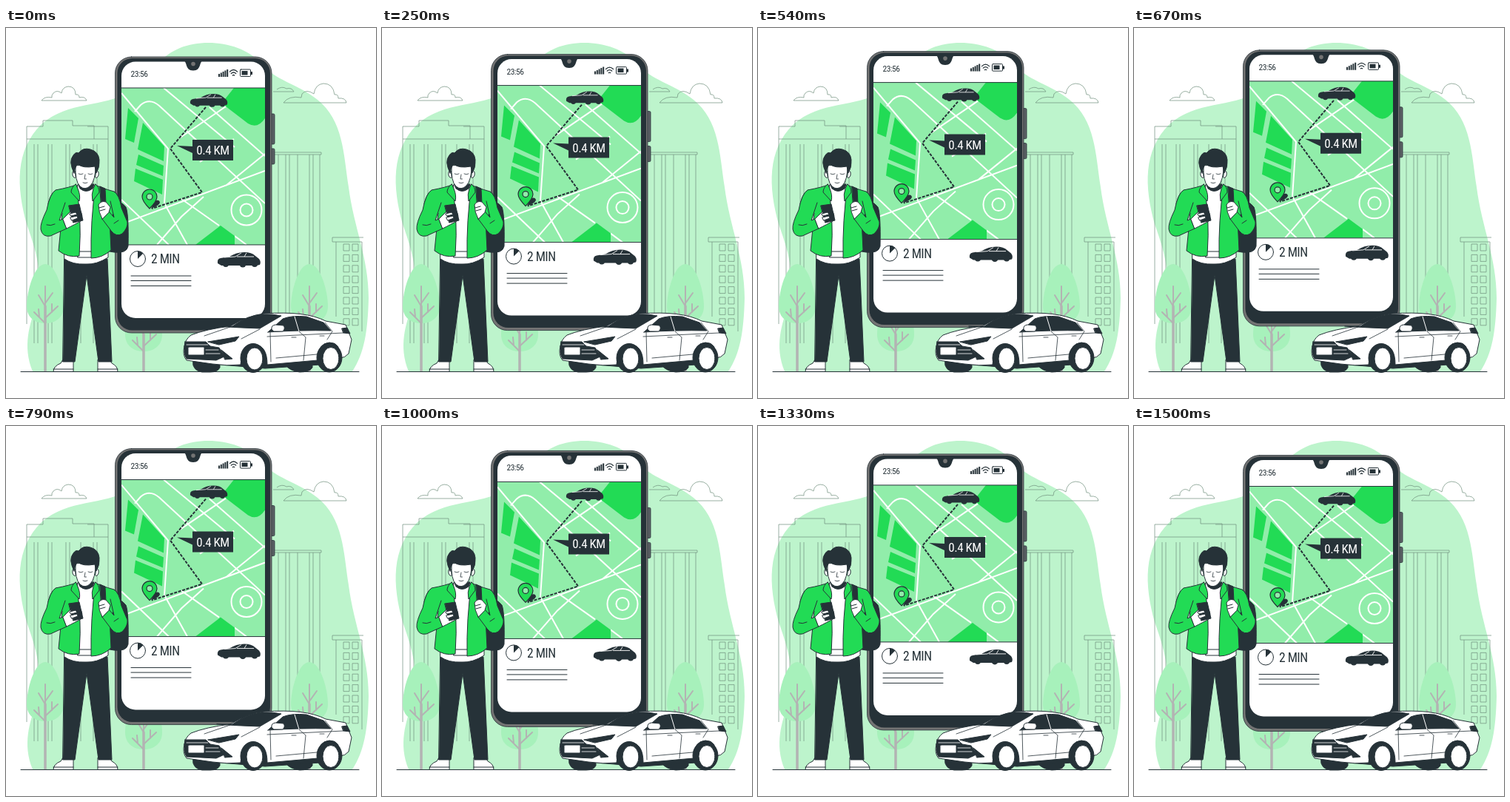
Recreate the animation shown at these times as an HTML page. Size 500 by 500 pixels, loop 1.54 s.

```html
<!DOCTYPE html>
<html lang="en">
<head>
<meta charset="utf-8">
<title>Ride on its way</title>
<style>
  html, body { margin: 0; width: 100%; height: 100%; overflow: hidden; background: #fff; }
  svg { display: block; width: 100vw; height: 100vh; }
  text { font-family: "Roboto Condensed", Roboto, sans-serif; letter-spacing: -.5px; fill: #263238; }
  .dark { fill: #263238; }
  .green { fill: #22db55; }
  .ink { stroke: #263238; stroke-linejoin: round; stroke-linecap: round; }
  .line { fill: none; }
  .white { fill: #fff; }
  .city { fill: none; stroke: #6f8f7b; stroke-width: .7; }
  .leaf { fill: #a7f1bb; }
  .trunk { fill: none; stroke: #b3b3b3; stroke-linecap: round; }
  .road { fill: none; stroke: #fff; stroke-width: 2; }
</style>
</head>
<body>
<svg viewBox="0 0 500 500">
  <defs>
    <clipPath id="mapArea"><path d="M156 81H350V293H156Z"/></clipPath>
    <clipPath id="aboveGround"><path d="M0 0H500V464H0Z"/></clipPath>
    <g id="tree">
      <path class="leaf" d="M0 -145C15 -145 25 -108 25 -88C25 -72 13 -65 0 -65C-13 -65 -25 -72 -25 -88C-25 -108 -15 -145 0 -145Z"/>
      <path class="trunk" stroke-width="3.5" d="M0 0V-88"/>
      <path class="trunk" stroke-width="2" d="M0 -115V-80M0 -72L17 -88M0 -65L-15 -80M0 -92L10 -106M0 -88L-9 -103M9 -80V-91M-8 -73L-9 -84"/>
    </g>
    <g id="miniCar">
      <path class="dark" d="M0 15Q-1 9 4 8L16 6Q25 0 36 0Q46 0 51 5L56 9Q59 13 57 17L52 18H5Z"/>
      <g class="dark"><circle cx="11" cy="16" r="4"/><circle cx="34" cy="16" r="4.500"/><circle cx="50" cy="16" r="4"/></g>
      <path d="M9 7L24 6L32 1M26 6H49M36 6L39 1" fill="none" stroke="#fff" stroke-width=".9"/>
    </g>
    <g id="wheel">
      <ellipse class="dark" rx="17" ry="19.500"/>
      <ellipse class="white" cx="2" cy="1" rx="11" ry="15"/>
    </g>
  </defs>

  <path fill="#bdf4cc" d="M36 464C22 430 32 400 41 375C51 330 40 300 28 265C14 215 12 165 48 130C85 98 130 108 168 86C195 68 200 42 235 27C270 13 320 20 345 48C362 70 395 76 421 97C456 125 456 170 463 215C470 270 490 310 490 365C489 410 484 440 468 464Z"/>

  <g class="city">
    <path d="M48 98H109Q107 92 99 94Q99 89 94 90Q94 79 84 79Q76 80 75 88Q69 83 64 88Q61 91 62 94Q52 92 48 98Z"/>
    <path d="M375 101H460Q459 94 449 95Q449 89 444 90Q442 75 429 75Q418 76 416 89Q406 82 400 89L399 94Q382 91 375 101ZM361 86H389Q386 80 379 82Q373 78 366 83"/>
    <path d="M28 400V133H50V125H90V132H119V150M28 150H138V133H110M138 150V230"/>
    <path id="stripesLeft"/>
    <path d="M360 168H426V171H360"/>
    <path id="stripesRight"/>
    <path d="M441 283H483M441 283V289H481M446 289V390M481 289V410"/>
    <path id="windows"/>
  </g>

  <g clip-path="url(#aboveGround)">
    <use href="#tree" x="53" y="464"/>
    <use href="#tree" x="186" y="502"/>
    <use href="#tree" x="410" y="464"/>
  </g>
  <path class="ink" d="M20 464.500H477"/>

  <g id="phone">
    <g fill="#5c6165" class="ink" stroke-width=".8">
      <rect x="357" y="116" width="6" height="41" rx="1.500"/>
      <rect x="357" y="163" width="6" height="21" rx="1.500"/>
      <rect x="147.500" y="39" width="211.500" height="373" rx="22" fill="#737373"/>
    </g>
    <rect class="dark" x="150.500" y="41" width="206.500" height="367.500" rx="20"/>
    <rect class="white" x="156" y="45.500" width="194" height="346.500" rx="19"/>
    <path class="dark" d="M238 43C246 44 241 57.500 253 57.500C265 57.500 260 44 268 43Z"/>
    <circle cx="253" cy="48.500" r="2.800" fill="#737373"/>

    <text x="168.500" y="66" font-size="11.500">23:56</text>
    <path class="dark" d="M287 62h2v4h-2zM289.800 60.500h2v5.500h-2zM292.600 59h2v7h-2zM295.400 57.500h2v8.500h-2zM298.200 56h2v10h-2z"/>
    <path class="ink line" stroke-width="1.300" d="M302.500 59Q307.500 54 312.500 59M304.300 61.500Q307.500 58.500 310.700 61.500M306.300 64Q307.500 63 308.700 64"/>
    <rect class="ink line" x="316.500" y="56" width="14" height="9.500" rx="1"/>
    <path class="dark" d="M318.500 58h8v5.500h-8zM331 59h2v4h-2z"/>

    <g clip-path="url(#mapArea)">
      <path fill="#91edaa" d="M156 81H350V293H156Z"/>
      <path class="road" d="M156 88L219 163L214 237M174 113L182 104Q194 94 207 105L350 237M213 81L309 161M275 107L350 173M234 149L303 102M262 181L308 150M350 193L156 265M297 213L350 170M237 231L288 267M214 237L245 293M156 232L220 293M204 293L237 255L267 228M309 281L325 293"/>
      <g class="green">
        <path d="M308 81H350V122Q340 137 327 129L297 106Q292 102 296 96Z"/>
        <path d="M165 108L179 122L173 155L161 150Z"/>
        <path d="M185 128L214 160L213 180L178 164Z"/>
        <path d="M179 171L213 186L212 200L176 185Z"/>
        <path d="M175 190L212 205L211 225L173 207Z"/>
        <path d="M256 293L290 267L309 281V293Z"/>
      </g>
      <g class="road"><circle cx="325" cy="246" r="20.500" fill="#91edaa"/><circle cx="325" cy="246" r="8.500"/></g>
      <path class="line" stroke="#263238" stroke-width="2" stroke-dasharray="4 1.700" d="M270 107L222 163L265 222L197 244"/>
      <path class="dark" d="M196 244L201 234Q207 231 208 236Q207 240 196 244Z"/>
      <path class="green ink" stroke-width="1.200" d="M194 244Q184 234 184 228A10 10 0 0 1 204 228Q204 234 194 244Z"/>
      <circle class="ink" cx="194" cy="228" r="4" fill="#91edaa" stroke-width="1.200"/>
    </g>
    <path class="ink" d="M156 81H350M156 293H350"/>
    <use href="#miniCar" transform="translate(249 89) scale(.87)"/>
    <path class="dark" d="M231 159L252 160V151H307V179H252V169Z"/>
    <text x="279.500" y="171" font-size="17" text-anchor="middle" style="fill:#fff">0.4 KM</text>

    <circle class="ink line" cx="178" cy="312" r="10.500"/>
    <path class="dark" d="M178 312V301.500A10.500 10.500 0 0 1 185.400 304.600Z"/>
    <text x="196" y="318.500" font-size="17.500">2 MIN</text>
    <use href="#miniCar" x="286" y="303"/>
    <path class="ink" d="M169 335H250M169 341.500H250M169 348.500H250"/>
  </g>

  <g id="person" class="ink" stroke-width="1">
    <path class="dark" d="M131 236Q154 230 162 242Q166 252 165 295Q163 305 146 303L128 300Z"/>
    <path class="white" d="M64 464Q64 457 74 453L77 448H91L91 464ZM124 464V448H140L143 453Q151 457 151 464Z"/>
    <path class="line" d="M64 461H91M124 461H151"/>
    <path class="dark" d="M79 312H137L143 451H125L109 334L93 451H77Z"/>
    <path class="white" d="M79 302H138V310Q122 320 108 319Q90 320 79 312ZM97 212H119V310H97Z"/>
    <path class="dark" d="M98 211H119L117 217Q108 224 100 217Z"/>
    <path class="white" d="M94 186Q93 207 100 214Q107 220 114 213Q121 206 121 186Z"/>
    <path class="white" d="M93 193Q89 192 90 199Q92 204 94 202ZM122 193Q126 192 125 199Q123 204 121 202Z"/>
    <path class="dark" d="M92 196Q84 180 91 172Q94 167 98 169Q104 161 114 164Q125 167 126 178Q127 188 122 196L120 187Q104 190 97 184Q93 188 92 196Z"/>
    <path class="line" stroke-width=".8" d="M98 197Q101 199 104 197M111 197Q114 199 117 197M107 198L106 204H108.500M104 209Q107 210.500 110 209"/>

    <path class="green" d="M94 212Q88 215 67 219Q60 224 57 238L76 250L71 301Q84 311 99 308Q103 250 94 212Z"/>
    <path class="green" d="M121 212Q128 216 146 221Q152 224 154 239L140 258L142 300Q130 311 115 311Q114 260 121 212Z"/>
    <path class="green" d="M94 211Q88 216 88 222L99 234Q101 226 97 217ZM121 211Q126 215 126 222L117 234Q115 225 118 217Z"/>
    <path class="dark" d="M127 214L134 217L136 258H130Z"/>
    <path class="green" d="M67 219Q59 224 55 246Q46 264 47 272Q49 283 60 281L82 271L77 258L72 260L80 236"/>
    <path class="green" d="M146 221Q153 225 156 243L164 262Q165 270 157 278Q149 283 142 274L130 258L139 248L146 256L141 234"/>
    <path class="line" d="M55 266Q60 268 66 265M152 260L146 264"/>
    <path class="white" d="M77 258L88 247Q95 241 100 247Q105 253 101 261Q94 265 82 271Z"/>
    <path class="dark" d="M85 240L99 238L104 260L91 263Z"/>
    <path class="white" d="M86 251L94 249L96 252L88 254ZM87 256L96 254L97 257L89 260Z"/>
    <path class="white" d="M130 258Q125 249 125 239Q128 233 135 235L141 242L139 249Z"/>
    <path class="line" d="M126 243L133 241M127 247L134 245"/>
  </g>

  <g id="car" class="ink" stroke-width="1">
    <path class="dark" d="M253 450H289V459Q286 465 276 465H265Q256 464 253 456ZM378 452H414V459Q410 465 397 465Q385 464 378 456Z"/>
    <path class="dark" d="M290 448H440V454L350 460L290 455Z"/>
    <path class="dark" d="M317 455Q319 428 336 428Q353 428 353 455ZM421 449Q421 424 437 423Q453 424 452 446Z"/>
    <path class="white" d="M241 430Q242 421 250 415Q270 407 303 403Q328 388 349 386Q405 382 432 396L459 401L467 421L463 440Q458 446 451 446Q453 425 437 425Q421 426 421 449L353 455Q353 428 335 428Q319 429 317 455Q299 457 279 454L244 449Q238 442 241 430Z"/>
    <path class="dark" d="M285 403H306Q326 389 345 387Q360 386 372 389L343 406Q312 405 285 403Z"/>
    <path class="dark" d="M354 411L374 393Q386 388 406 390L429 398L439 409Q398 408 354 411Z"/>
    <path d="M390 390L396 410" stroke="#fff"/>
    <path class="white" d="M359 407Q358 402 364 401L375 402Q378 406 374 410H362Z"/>
    <path class="line" stroke-width=".8" d="M353 417L456 412M357 411L358 451M396 410L405 418L402 449M431 398L441 410L434 421M303 404L268 416M343 407L318 420M365 446L420 441M386 418H392M424 416H430"/>
    <path class="dark" d="M273 424L315 417L310 423L288 428ZM454 406L461 405L465 413L456 412Z"/>
    <path class="dark" d="M242 424L270 424L276 430L288 432L295 444L284 449L244 447Q239 440 242 424Z"/>
    <path d="M244 428H273M270 435H287M270 440H289" stroke="#fff" stroke-width=".8"/>
    <rect class="white" x="246" y="431" width="22" height="11" rx="1"/>
    <path class="dark" d="M291 435L306 447L296 448Z"/>
    <use href="#wheel" x="334" y="446"/>
    <use href="#wheel" x="437" y="445.500"/>
  </g>
</svg>

<script>
  const PERIOD = 1540, LIFT = 10.5, LEAD = 65;
  const $ = id => document.getElementById(id);
  const columns = (xs, top, bottom) => xs.map(x => `M${x} ${top}V${bottom}`).join('');

  $('stripesLeft').setAttribute('d', columns([38, 43, 57, 62, 81, 86, 101, 118, 123], 157, 426));
  $('stripesRight').setAttribute('d', columns([368, 378, 383, 394, 410, 415, 424], 171, 393));

  let panes = '';
  for (let row = 0; row < 8; row++)
    for (const x of [456, 468]) panes += `M${x} ${292 + row * 14.4}h8v9h-8z`;
  $('windows').setAttribute('d', panes);

  // Steady rise and fall of the phone
  const lift = t => LIFT * (1 - Math.abs(1 - 2 * (t % PERIOD) / PERIOD));

  function draw() {
    const y = lift(LEAD) - lift(performance.now() + LEAD);
    $('phone').setAttribute('transform', `translate(0 ${y.toFixed(2)})`);
    requestAnimationFrame(draw);
  }
  draw();
</script>
</body>
</html>
```
